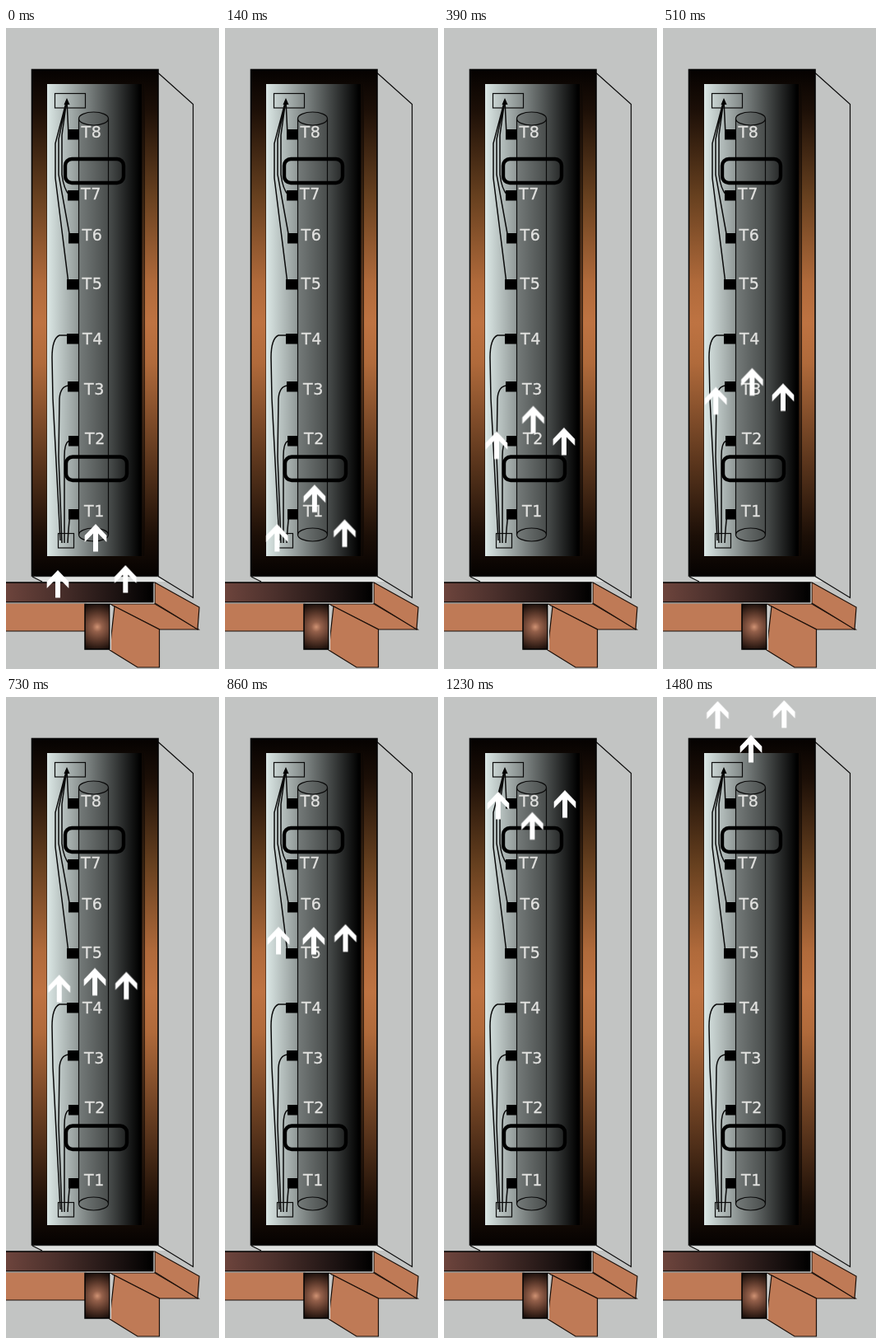
An HTML page that plays this animation: 259x778 px, repeating every 1510 ms.

```html
<!DOCTYPE html>
<html lang="en">
<head>
<meta charset="utf-8">
<title>Rising air through a heated column</title>
<style>
html, body { margin: 0; width: 100%; height: 100%; overflow: hidden; background: #c2c4c3; }
svg { display: block; width: 259px; height: 778px; }
.label {
  font: 19px "DejaVu Sans", sans-serif; letter-spacing: .6px;
  fill: #e2e2e0; stroke: #e2e2e0; stroke-width: .3;
}
.line { fill: none; stroke: #0a0a0a; stroke-width: 1.2; }
.wire { fill: none; stroke: #0a0a0a; stroke-width: 1.5; }
.handle { fill: none; stroke: #000; stroke-width: 4.4; }
.wood { fill: #bf7a56; stroke: #1a0e08; stroke-width: 1.2; }
</style>
</head>
<body>
<svg viewBox="0 0 259 778">
  <defs>
    <linearGradient id="frame" x2="0" y2="1">
      <stop offset="0" stop-color="#050201"/>
      <stop offset="0.08" stop-color="#1c0f07"/>
      <stop offset="0.25" stop-color="#67401f"/>
      <stop offset="0.42" stop-color="#b06a3b"/>
      <stop offset="0.5" stop-color="#be7342"/>
      <stop offset="0.58" stop-color="#b06a3b"/>
      <stop offset="0.76" stop-color="#623a1f"/>
      <stop offset="0.92" stop-color="#1c0f07"/>
      <stop offset="1" stop-color="#050201"/>
    </linearGradient>
    <linearGradient id="panel">
      <stop offset="0" stop-color="#dbe7e5"/>
      <stop offset="0.98" stop-color="#000"/>
    </linearGradient>
    <linearGradient id="tube">
      <stop offset="0" stop-color="#757b7a"/>
      <stop offset="1" stop-color="#4a4e4d"/>
    </linearGradient>
    <linearGradient id="shelf">
      <stop offset="0" stop-color="#6e453d"/>
      <stop offset="0.35" stop-color="#4b302c"/>
      <stop offset="0.75" stop-color="#1d1312"/>
      <stop offset="1" stop-color="#000"/>
    </linearGradient>
    <radialGradient id="post" gradientUnits="userSpaceOnUse" cx="111" cy="727" r="30">
      <stop offset="0" stop-color="#cf9273"/>
      <stop offset="0.2" stop-color="#94604a"/>
      <stop offset="0.55" stop-color="#5c392b"/>
      <stop offset="1" stop-color="#140b08"/>
    </radialGradient>
    <path id="arrow" fill="#fff" d="M0 0L13.3 14V22L3 11.5V33.5H-3V11.5L-13.3 22V14Z"/>
  </defs>

  <rect width="259" height="778" fill="#c2c4c3"/>

  <!-- stand -->
  <path class="wood" d="M-2 698H97V732H-2Z"/>
  <path class="wood" d="M126 699H181L234 730H187Z"/>
  <path class="wood" d="M181 673L235 703L233 730L181 698Z"/>
  <path class="wood" d="M132 702L186.5 730V776H160L126 755Z"/>
  <rect x="96" y="699" width="30" height="55" fill="url(#post)" stroke="#000" stroke-width="1.5"/>
  <path d="M127.3 700V755" stroke="#d8d8d6" stroke-width="1.5"/>
  <path d="M34 667H186L196 672H44Z" fill="#dfe1e0"/>
  <rect x="-2" y="673" width="181" height="24" fill="url(#shelf)" stroke="#000" stroke-width="1.5"/>
  <path d="M0 698H180V674" fill="none" stroke="#dcdcda"/>

  <!-- cabinet -->
  <path class="line" d="M185 54.5L227.5 92.5V691.5L185 665.5M32 666L44 672"/>
  <rect x="31.5" y="50.5" width="153.5" height="614.5" fill="url(#frame)" stroke="#050505" stroke-width="1.6"/>
  <rect x="49.5" y="68" width="119.5" height="573.5" fill="#120a05"/>
  <rect x="50" y="68" width="115" height="573" fill="url(#panel)"/>
  <rect x="165.5" y="68" width="3" height="573" fill="url(#frame)" opacity=".45"/>

  <!-- tube -->
  <path d="M88 110V615A18 8 0 0 0 124 615V110A18 8 0 0 0 88 110Z" fill="url(#tube)"/>
  <path class="line" d="M88.5 110V615M124.5 110V615"/>
  <ellipse class="line" cx="106.5" cy="110" rx="18" ry="8"/>
  <ellipse class="line" cx="106.5" cy="615" rx="18" ry="8"/>

  <!-- wiring -->
  <rect class="line" x="59.5" y="79.5" width="37" height="17.5"/>
  <rect class="line" x="63.5" y="613.5" width="19" height="17.5"/>
  <path class="wire" d="M74 87L76 130M74 87L68 130V178Q70 195 77 203M74 87L64 135V178L78 255M74 87L60 140V182L76 310"/>
  <path class="wire" d="M76 373H65Q56 377 56 400L57 450L66 622M76 434Q66 435 65 450L64 520L68 625M77 501Q71 503 71 520V625M78 590Q76 605 75 625"/>
  <path d="M70.5 93L74 85L77.5 93Z"/>
  <g id="sensors"></g>
  <rect class="handle" x="72" y="159" width="71" height="29" rx="8"/>
  <rect class="handle" x="73" y="520.5" width="74" height="28.5" rx="8"/>
  <g id="arrows"></g>
</svg>
<script>
const NS = 'http://www.w3.org/2000/svg';
const LOOP = 1510;

function add(parent, tag, attrs, text) {
  const el = document.createElementNS(NS, tag);
  for (const key in attrs) el.setAttribute(key, attrs[key]);
  if (text) el.textContent = text;
  return document.getElementById(parent).appendChild(el);
}

// Label x, label baseline, square x, square top; T1 upwards.
[
  [95, 593, 76, 584], [96, 505, 76, 495], [95, 445, 75, 429], [93, 384, 74, 371],
  [92.5, 317, 74, 305], [92.5, 258, 76, 249], [91, 207.5, 75, 197], [91.5, 132.5, 75, 123]
].forEach(([x, y, sx, sy], i) => {
  add('sensors', 'rect', { x: sx, y: sy, width: 88 - sx, height: 12.5 });
  add('sensors', 'text', { x, y, class: 'label' }, 'T' + (i + 1));
});

// Share of the climb reached at a time in ms.
const climb = [[0, 0], [40, .017], [510, .3405], [1010, .6835], [1480, 1]];

function progress(t) {
  const i = Math.max(1, climb.findIndex(([time]) => time >= t));
  const [t0, p0] = climb[i - 1], [t1, p1] = climb[i];
  return p0 + (p1 - p0) * (t - t0) / (t1 - t0);
}

// Ticks come every 25 ms, rounded to 10 ms.
function tick(k) {
  if (k === 0) return 0;
  if (k < 23) return Math.floor((15 + 25 * k) / 10) * 10;
  return Math.ceil((5 + 25 * k) / 10) * 10;
}

const times = Array.from({ length: 60 }, (_, k) => tick(k));

// Tip position at the start and end of the climb.
[
  [63, 658, 66.5, 5], [109, 602, 107, 46], [145.3, 652, 147.3, 4]
].forEach(([x0, y0, x1, y1]) => {
  const pose = p => `translate(${x0 + (x1 - x0) * p}px, ${y0 + (y1 - y0) * p}px)`;
  const steps = times.map(t => ({
    offset: t / LOOP, transform: pose(progress(t)), easing: 'steps(1, end)'
  }));
  steps.push({ offset: 1, transform: pose(1) });
  add('arrows', 'use', { href: '#arrow' }).animate(steps, { duration: LOOP, iterations: Infinity });
});
</script>
</body>
</html>
```
